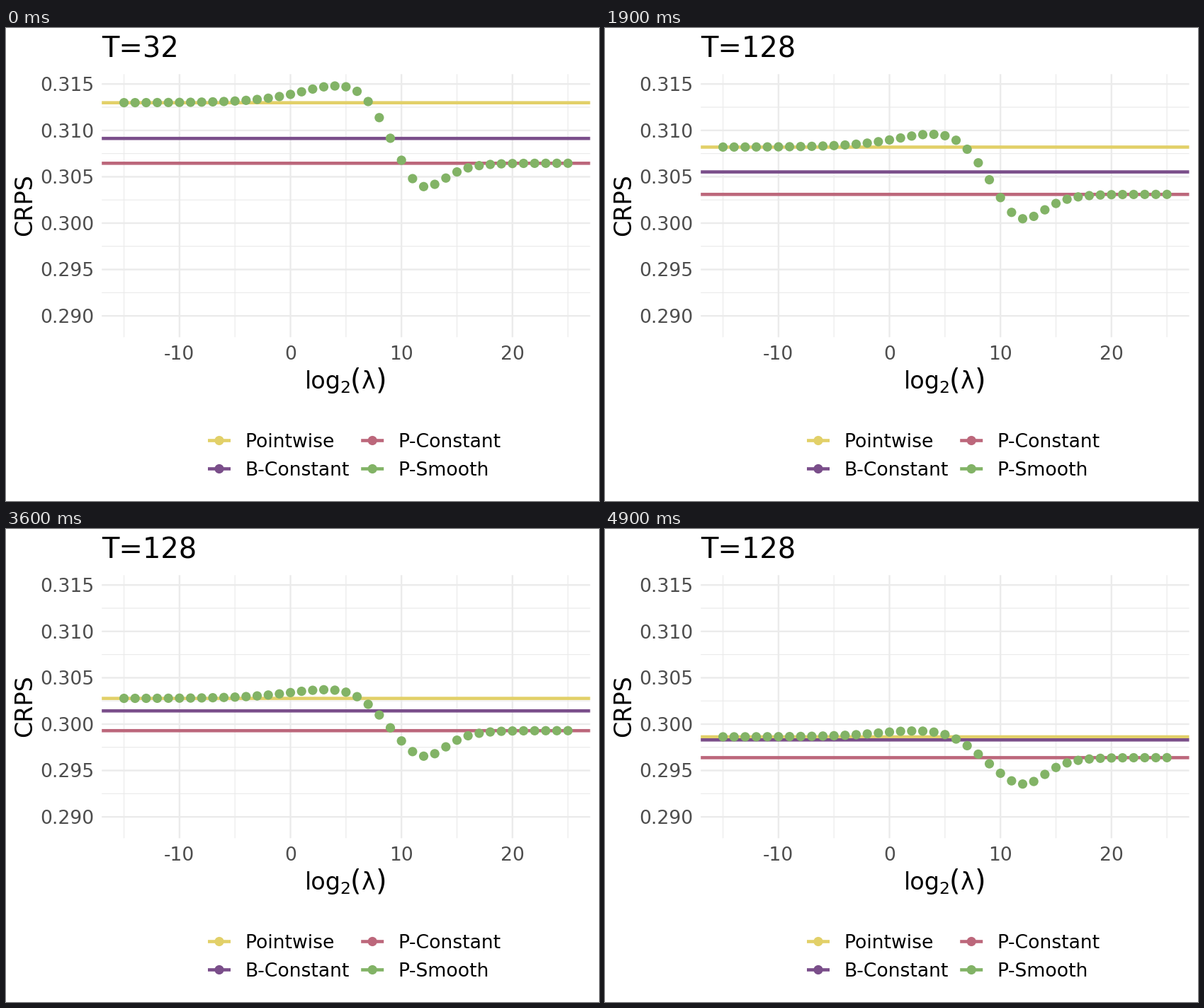
These frames come from a looping animation (837x669 px, 8000 ms). A matplotlib script:

```python
import numpy as np
import matplotlib.pyplot as plt
from matplotlib.animation import FuncAnimation
from matplotlib.patches import Circle

W, H, DPI = 837, 669, 64
PT = 72 / DPI  # points per pixel

FRAMES, INTERVAL = 80, 100
HOLD, STEPS = 4, 45  # frames of rest, then frames of linear motion

YELLOW, PURPLE, PINK, GREEN = "#E2D068", "#7A4E8A", "#BC677B", "#82B366"
GRID, TICK = "#EBEBEB", "#4D4D4D"
LEFT, RIGHT, TOP, BOTTOM = 135.2, 824.5, 65.3, 437.3
LINE_W, DOT = 4.6, 13.2
TITLE, LABEL, TEXT = 40, 33.33, 26.67  # font sizes in pixels
DIGIT = 0.636 * TEXT


def px(x):
    return LEFT + (x + 17) / 44 * (RIGHT - LEFT)


def py(y):
    return 79.2 + (0.315 - y) * 13120


plt.rcParams.update({"font.family": "DejaVu Sans", "text.kerning_factor": 6})
fig = plt.figure(figsize=(W / DPI, H / DPI), dpi=DPI, facecolor="white")
ax = fig.add_axes([0, 0, 1, 1])
ax.set_xlim(0, W)
ax.set_ylim(H, 0)
ax.axis("off")


def line(xs, ys, color, width, z):
    return ax.plot(xs, ys, color=color, lw=width * PT, zorder=z,
                   solid_capstyle="butt", snap=False)[0]


def dot(x, y, color, z):
    return ax.add_patch(Circle((x, y), DOT / 2, fc=color, lw=0, zorder=z))


def label(x, y, s, size, color="black", **kw):
    return ax.text(x, y, s, fontsize=size * PT, color=color,
                   ha="left", va="baseline", **kw)


def grid(xs, ys, width, z):
    for x in px(xs):
        line([x, x], [TOP, BOTTOM], GRID, width, z)
    for y in py(ys):
        line([LEFT, RIGHT], [y, y], GRID, width, z)


# Thin minor lines below the major ones
x_major = np.arange(-10, 21, 10)
y_major = np.arange(0.290, 0.3151, 0.005)
grid(np.arange(-15, 26, 10), y_major[:-1] + 0.0025, 1.2, 1)
grid(x_major, y_major, 2.4, 2)

# Axis text
for v in y_major:
    label(48, py(v) + 9.8, f"{v:.3f}", TEXT, TICK)
for v in x_major:
    width = DIGIT * len(str(abs(v))) + (0.361 * TEXT if v < 0 else 0)
    label(px(v) - width / 2, 469, str(v), TEXT, TICK)

label(36, 293.7, "CRPS", LABEL, rotation=90, rotation_mode="anchor")
label(421.5, 510, "log", LABEL)
label(471.4, 516, "2", 0.7 * LABEL)
label(486, 510, "(", 1.2 * LABEL)
label(502, 510, "λ", LABEL)
label(521.4, 510, ")", 1.2 * LABEL)

# Legend
for i, (name, color) in enumerate((("Pointwise", YELLOW), ("B-Constant", PURPLE),
                                   ("P-Constant", PINK), ("P-Smooth", GREEN))):
    x, y = 301 + 216.2 * (i // 2), 583.5 + 40 * (i % 2)
    line([x - 16, x + 16], [y, y], color, LINE_W, 3)
    dot(x, y, color, 4)
    label(x + 36, y + 9.6, name, TEXT)

# Vertical pixel positions of the flat lines in the first and last state
LEVELS = ((YELLOW, 105.7, 294.0), (PURPLE, 156.2, 298.3), (PINK, 191.3, 323.4))


def sech(x):
    return 1 / np.cosh(x)


def curve(x, left, right, peak_x, peak, dip, skew, dip_x=12):
    """Rise from the left level to a peak, ease to the dip, settle at the right."""
    rise = left + (peak - left) * sech(0.33 * (x - peak_x))
    u = np.clip((x - peak_x) / (dip_x - peak_x), 0, 1) ** skew
    fall = peak + (dip - peak) * u * u * (3 - 2 * u)
    after = np.maximum(x - dip_x, 0)
    settle = right + (dip - right) * sech(0.46 * after ** 1.16)
    return np.where(x < peak_x, rise, np.where(x < dip_x, fall, settle))


lam = np.arange(-15, 26)
start = curve(lam, 105.7, 191.3, peak_x=4, peak=82, dip=224.3, skew=1.42)
end = curve(lam, 294.0, 323.4, peak_x=2, peak=285.7, dip=360.7, skew=1.53)

lines = [line([LEFT, RIGHT], [a, a], color, LINE_W, 5) for color, a, _ in LEVELS]
dots = [dot(px(x), y, GREEN, 6) for x, y in zip(lam, start)]
title = label(135.2, 42, "T=32", TITLE)


def update(i):
    t = min(max(i - HOLD, 0), STEPS) / STEPS
    for artist, (_, a, b) in zip(lines, LEVELS):
        y = a + (b - a) * t
        artist.set_ydata([y, y])
    for artist, x, y in zip(dots, px(lam), start + (end - start) * t):
        artist.center = x, y
    title.set_text("T=128" if t > 0 else "T=32")
    return [*lines, *dots, title]


anim = FuncAnimation(fig, update, frames=FRAMES, interval=INTERVAL,
                     repeat=True, repeat_delay=0, blit=False)
plt.show()
```
